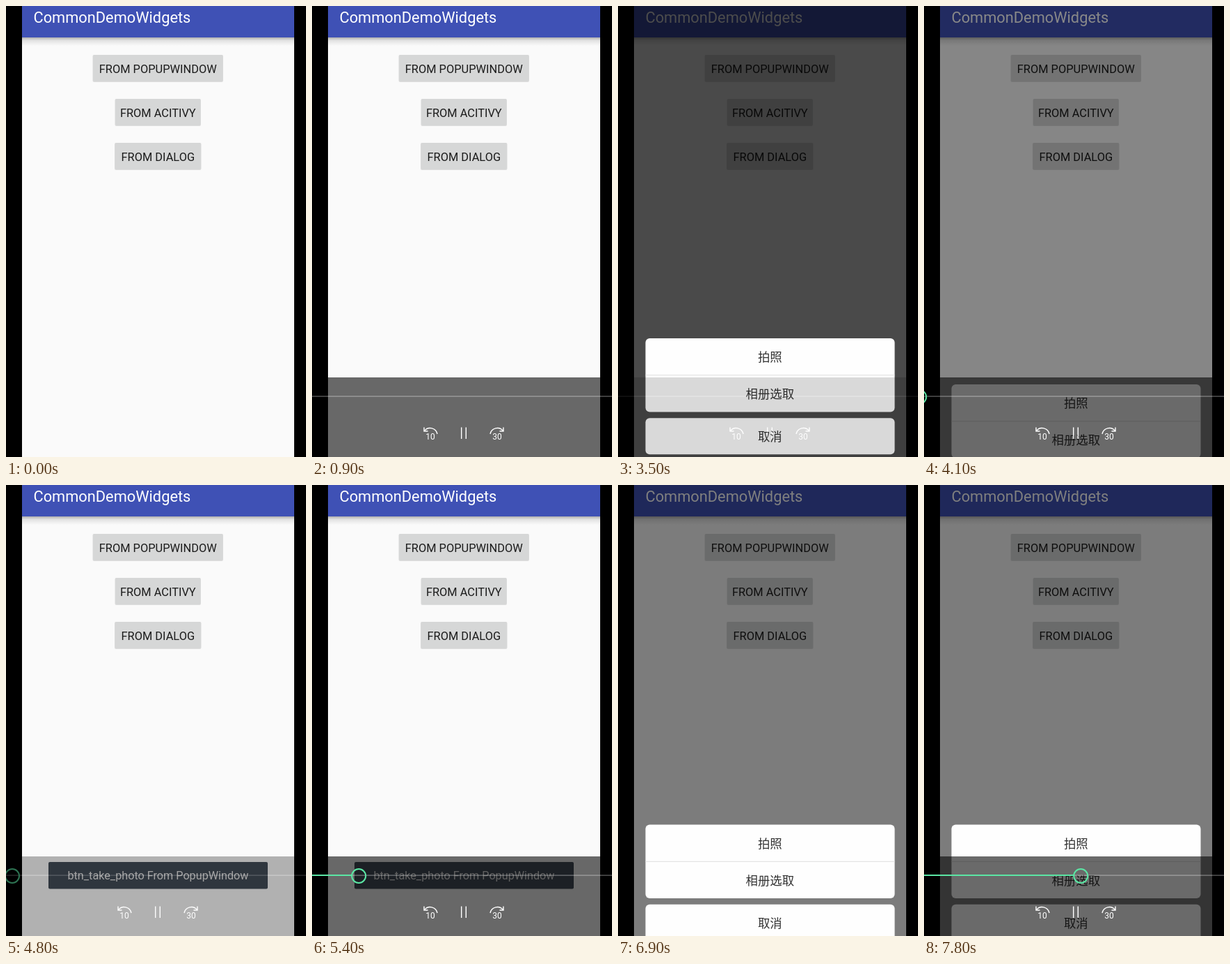
An HTML page that plays this animation: 431x646 px, repeating every 8000 ms.

```html
<!DOCTYPE html>
<html lang="zh-CN">
<head>
<meta charset="utf-8">
<title>Popup demo</title>
<style>
  html, body { margin: 0; width: 100%; height: 100%; overflow: hidden; background: #000; }
  svg { display: block; width: 100%; height: 100%; }
  text { font-family: Roboto, "Noto Sans CJK SC", "Noto Sans CJK", sans-serif; }
  .mid { text-anchor: middle; }
  .label { font-size: 16.4px; fill: #1c1c1c; }
  .item { font-size: 17.4px; fill: #333; }
  .toast { font-size: 16.2px; fill: #e6e6e6; }
  .skip { font-size: 12px; fill: #fff; }
  .icon { fill: none; stroke: #fff; stroke-width: 1.4; }
</style>
</head>
<body>
<svg viewBox="0 0 431 646" preserveAspectRatio="none">
  <defs>
    <linearGradient id="shade" x2="0" y2="1">
      <stop offset="0" stop-opacity=".3"/>
      <stop offset=".35" stop-opacity=".1"/>
      <stop offset="1" stop-opacity="0"/>
    </linearGradient>
    <clipPath id="screen"><rect x="23" width="391" height="646"/></clipPath>
  </defs>
  <rect width="431" height="646"/>

  <g clip-path="url(#screen)">
    <rect x="23" width="391" height="646" fill="#fafafa"/>
    <rect x="23" width="391" height="45" fill="#3f51b5"/>
    <rect x="23" y="45" width="391" height="12" fill="url(#shade)"/>
    <text x="39.5" y="24" font-size="21.8" fill="#fff">CommonDemoWidgets</text>
    <g id="buttons"></g>
    <rect id="dim" x="23" width="391" height="646"/>
    <g id="sheet">
      <rect x="39.5" width="358" height="105.5" rx="6" fill="#fefefe"/>
      <rect x="39.5" y="52.3" width="358" height="1" fill="#dedede"/>
      <rect x="39.5" y="114.3" width="358" height="52" rx="6" fill="#fefefe"/>
      <text class="item mid" x="218.3" y="33">拍照</text>
      <text class="item mid" x="218.3" y="86">相册选取</text>
      <text class="item mid" x="218.3" y="147">取消</text>
    </g>
    <g id="toast">
      <rect x="61" y="540" width="315" height="38.5" rx="2" fill="#434c58"/>
      <text class="toast mid" x="218.5" y="564.5">btn_take_photo From PopupWindow</text>
    </g>
  </g>

  <g id="player">
    <rect x="23" y="532" width="391" height="114" fill-opacity=".58"/>
    <rect y="558.5" width="431" height="1.2" fill="#fff" fill-opacity=".4"/>
    <rect id="played" y="558" height="2" fill="#5be6a4"/>
    <circle id="knob" cy="560" r="10" fill="none" stroke="#5be6a4" stroke-width="2"/>
    <path id="rewind" class="icon" d="M180 613A10.5 10.5 0 0 0 161.5 608.5M161 603.5v5.5h5.5"/>
    <use href="#rewind" transform="matrix(-1 0 0 1 436 0)"/>
    <text class="skip mid" x="170" y="620.5">10</text>
    <text class="skip mid" x="266" y="620.5">30</text>
    <path class="icon" d="M214.7 603.5v16.5M221.3 603.5v16.5"/>
  </g>
</svg>

<script>
const LOOP = 8000, FRAME = 100;
const $ = id => document.getElementById(id);
const set = (id, name, value) => $(id).setAttribute(name, value);
const ramp = (t, from, to) => Math.min(1, Math.max(0, (t - from) / (to - from)));
const ease = u => (1 - Math.cos(Math.PI * u)) / 2;
// Rises over one interval and falls over a later one.
const pulse = (t, inFrom, inTo, outFrom, outTo) => ramp(t, inFrom, inTo) - ramp(t, outFrom, outTo);

const buttons = [
  ['FROM POPUPWINDOW', 125, 186.5, 70],
  ['FROM ACITIVY', 157, 122.5, 133],
  ['FROM DIALOG', 156.5, 123.5, 196]
];
$('buttons').innerHTML = buttons.map(([label, x, w, y], i) => `
  <rect x="${x - .5}" y="${y}" width="${w + 1}" height="39" rx="2" fill="#c6c6c6" fill-opacity=".55"/>
  <rect id="button${i}" x="${x}" y="${y}" width="${w}" height="38" rx="2"/>
  <text class="label mid" x="218.3" y="${y + 25.7}">${label}</text>`).join('');

function knobX(t) {
  const hop = 15.8;
  return t < 5050
    ? 9 + hop * Math.min(0, Math.ceil((t - 4550) / 250))
    : 83 + hop * Math.floor((t - 5600) / 244);
}

function draw(t) {
  const pressed = [t >= 1600 && t < 1800, t >= 6500 && t < 6800, false];
  pressed.forEach((down, i) => set('button' + i, 'fill', down ? '#c4c5c5' : '#d6d7d7'));

  const second = t >= 6700;
  const shown = second
    ? ease(ramp(t, 6700, 6900))
    : ease(ramp(t, 1680, 2150)) - ease(ramp(t, 3950, 4300));
  const top = (second ? 486.5 : 476) + 170 * (1 - shown);
  set('sheet', 'transform', `translate(0 ${top})`);
  set('dim', 'opacity', second ? .5 * ramp(t, 6700, 6900) : .7 * pulse(t, 1600, 1800, 4000, 4300));

  set('toast', 'opacity', pulse(t, 4250, 4500, 5820, 6220));

  const player = pulse(t, 0, 400, 1680, 2080) + pulse(t, 3400, 3800, 4600, 5000)
    + pulse(t, 5000, 5400, 6300, 6700) + ramp(t, 7200, 7600);
  const x = knobX(t);
  set('player', 'opacity', player);
  set('knob', 'cx', x);
  set('played', 'width', Math.max(0, x - 10));
}

const start = performance.now();
function tick() {
  const t = (performance.now() - start) % LOOP;
  draw(Math.floor(t / FRAME) * FRAME);
  requestAnimationFrame(tick);
}
tick();
</script>
</body>
</html>
```
